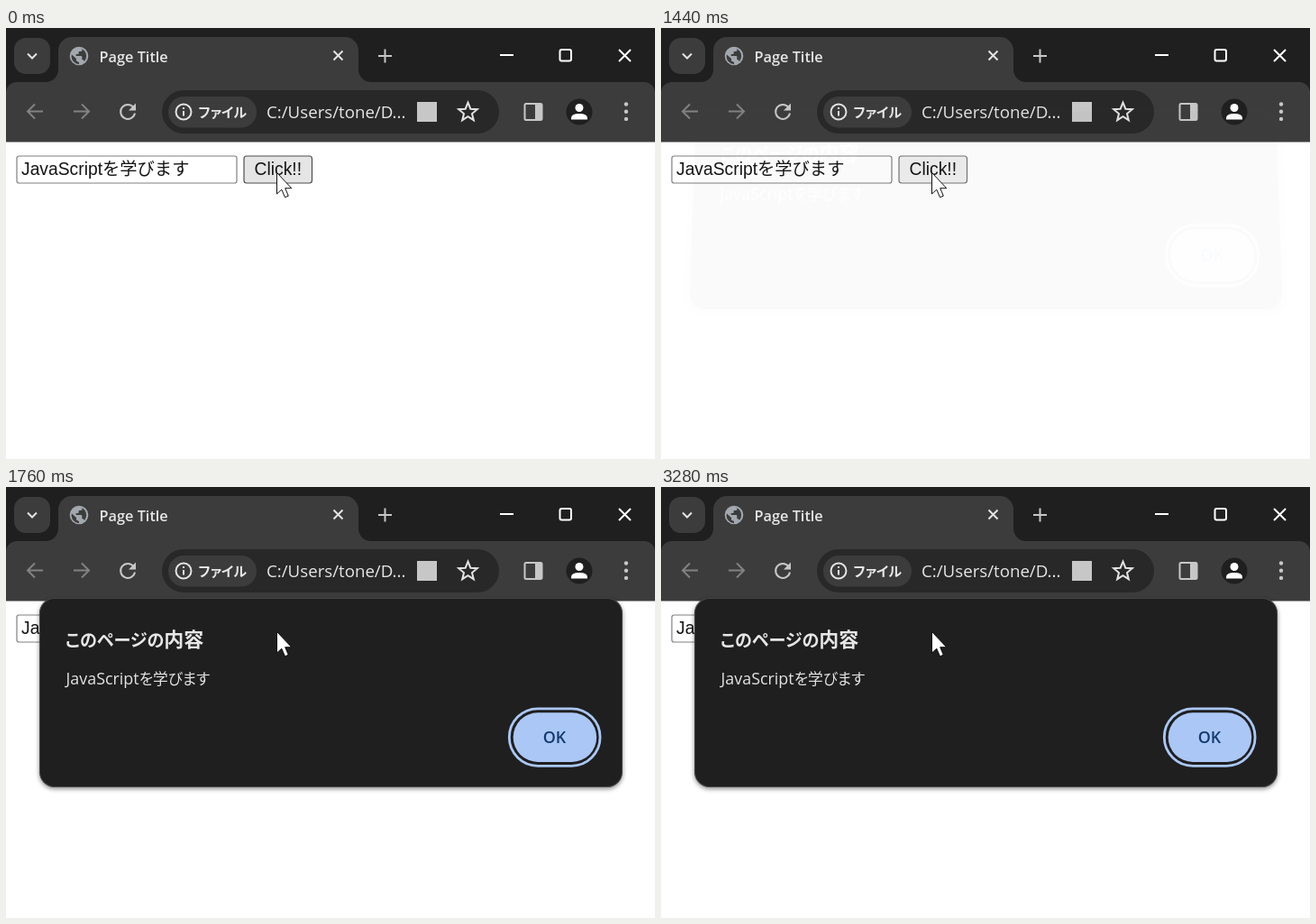
These frames come from a looping animation (720 by 478 pixels, 3.36 s). An HTML page:

```html
<!DOCTYPE html>
<html lang="ja">
<head>
<meta charset="utf-8">
<title>Page Title</title>
<style>
  html, body { margin: 0; width: 100%; height: 100%; overflow: hidden; background: #fff; }
  svg { position: absolute; left: 0; top: 0; display: block; }
  .ui { font-family: "Open Sans", "Noto Sans", "Noto Sans CJK JP", sans-serif; }
  .jp { font-family: "Noto Sans CJK JP", "Noto Sans CJK", sans-serif; font-feature-settings: "palt"; }
  .form { font-family: "Liberation Sans", "Noto Sans CJK JP", sans-serif; font-size: 19.3px; fill: #141414; }
  .line { fill: none; stroke: #e3e3e3; stroke-width: 2; }
  .dim { stroke: #828282; }
  .soft { stroke: #c7c7c7; }
  .bright { stroke: #fff; }
  #dialog {
    position: absolute; left: 37px; top: 122.5px; width: 647px; height: 210.5px;
    box-sizing: border-box; border-radius: 17px; background: #1f1f1f;
    box-shadow: 0 0 0 1px rgba(110, 110, 110, .5) inset, 0 2px 5px rgba(0, 0, 0, .45);
  }
</style>
</head>
<body>
<svg width="720" height="478" viewBox="0 0 720 478">
  <!-- title bar and tab -->
  <rect width="720" height="80" fill="#1f1f1f"/>
  <path fill="#3c3c3c" d="M0 127V72A12 12 0 0 1 12 60H44A14 14 0 0 0 58 46V25A15 15 0 0 1 73 10H376A15 15 0 0 1 391 25V46A14 14 0 0 0 405 60H708A12 12 0 0 1 720 72V127Z"/>
  <rect x="9" y="11" width="40" height="40" rx="13" fill="#3c3c3c"/>
  <path class="line" d="M24 28.5l5 5 5-5"/>
  <circle cx="81" cy="31" r="10.3" fill="#a3a8ae"/>
  <path fill="#3c3c3c" d="M73 29.5l5 4.500v2.500l3 1.500v2.200q-8-1.500-8.500-9zM83 22.800q6 2 6.200 8.500-.2 3.500-2.200 5.700-.8-2-2.700-2v-3q0-1-1-1h-5.600v-2h2q1 0 1-1v-2h2q2 0 2-2z"/>
  <text class="ui" x="103.5" y="37.500" font-size="16.300" font-weight="600" fill="#e6e6e6">Page Title</text>
  <path class="line" d="M363.5 25.500l10 10m0-10l-10 10"/>
  <path class="line soft" d="M413 31h15M420.5 23.500v15"/>
  <path class="line bright" d="M548 30h15M680 24l13 13m0-13l-13 13"/>
  <rect class="line bright" x="614.5" y="24" width="12.500" height="12.500" rx="2"/>

  <!-- toolbar -->
  <path class="line dim" d="M41 92.500H24.500m7.500-8l-8 8 8 8"/>
  <path class="line dim" d="M75 92.500H91.500m-7.500-8l8 8-8 8"/>
  <path class="line soft" d="M141.5 88a8 8 0 1 0 1.500 6.500"/>
  <path fill="#c7c7c7" d="M144 83.500v8h-8z"/>
  <rect x="173" y="69" width="374" height="48" rx="24" fill="#282828"/>
  <rect x="180" y="76" width="98" height="34.500" rx="17.200" fill="#3c3c3c"/>
  <circle class="line" cx="197" cy="93" r="8.500"/>
  <path class="line" d="M197 92v5.500M197 88v2"/>
  <text class="jp" x="213.5" y="99" font-size="15" font-weight="700" fill="#e8e8e8">ファイル</text>
  <text class="ui" x="289" y="100" font-size="18.700" font-weight="500" fill="#e6e6e6">C:/Users/tone/D...</text>
  <rect x="456" y="82" width="22" height="22" fill="#c7c7c7"/>
  <path id="star" class="line"/>
  <rect class="line soft" x="575.5" y="84" width="19" height="18" rx="1.500"/>
  <path fill="#c7c7c7" d="M587 84h8v18h-8z"/>
  <circle cx="636" cy="93" r="14.500" fill="#1f1f1f"/>
  <circle cx="636" cy="88.500" r="4.500" fill="#fff"/>
  <path fill="#fff" d="M627 101.500v-1.500q0-5 9-5t9 5v1.500z"/>
  <g fill="#c7c7c7"><circle cx="688" cy="84.500" r="2.200"/><circle cx="688" cy="92.700" r="2.200"/><circle cx="688" cy="100.900" r="2.200"/></g>

  <!-- page -->
  <rect y="126.500" width="720" height="352" fill="#fff"/>
  <rect x="12" y="142" width="244" height="30" rx="2.500" fill="#fff" stroke="#808080" stroke-width="1.200"/>
  <text class="form" x="17" y="163">JavaScriptを学びます</text>
  <rect id="button" x="264" y="142" width="75.500" height="30" rx="3" stroke-width="1.200"/>
  <text class="form" x="275.5" y="163">Click!!</text>
</svg>

<div id="dialog">
  <svg width="647" height="210" viewBox="37 122.500 647 210">
    <text class="jp" x="66" y="176" font-size="19.100" font-weight="700" fill="#e6e6e6">このページの<tspan font-size="22">内容</tspan></text>
    <text class="ui" x="66.500" y="218.500" font-size="17.900" font-weight="500" fill="#e3e3e3">JavaScript<tspan class="jp" font-size="16.700">を学びます</tspan></text>
    <rect x="558.300" y="245.300" width="100.800" height="63.500" rx="31.700" fill="none" stroke="#abc7f6" stroke-width="2.800"/>
    <rect x="562.700" y="249.800" width="92.500" height="54.600" rx="27.300" fill="#abc7f6"/>
    <text class="ui" x="608.500" y="283.700" font-size="17.900" font-weight="600" text-anchor="middle" fill="#123a70">OK</text>
  </svg>
</div>

<svg width="720" height="478" viewBox="0 0 720 478">
  <path d="M300.5 160.500V184L305.800 179.200 309.500 187.800 313.300 186.200 309.700 177.700H316.800Z" fill="#fff" stroke="#111"/>
</svg>

<script>
  const LOOP = 3360, STEP = 80;
  const byId = id => document.getElementById(id);
  const button = byId('button'), dialog = byId('dialog');

  // start, fill, border
  const buttonStates = [
    [0, '#e5e5e5', '#4f4f4f'],
    [800, '#f5f5f5', '#8d8d8d'],
    [1440, '#efefef', '#767676']
  ];

  // start, opacity, shift, tilt, scaleX, scaleY
  const dialogPoses = [
    [0, 0, 0, 0, 1, 1],
    [1440, .027, -28, 6.3, 1.006, 1.05],
    [1520, .53, -16.5, 4.6, 1.0025, 1.018],
    [1600, 1, -3.5, .5, 1, 1.004],
    [1680, 1, 0, 0, 1, 1]
  ];

  const current = (table, t) => table.filter(row => row[0] <= t).pop();

  function starPath(cx, cy, outer, inner) {
    const points = Array.from({ length: 10 }, (_, i) => {
      const r = i % 2 ? inner : outer, a = i * Math.PI / 5;
      return (cx + r * Math.sin(a)).toFixed(1) + ' ' + (cy - r * Math.cos(a)).toFixed(1);
    });
    return 'M' + points.join('L') + 'Z';
  }

  function draw(t) {
    const [, fill, border] = current(buttonStates, t);
    button.setAttribute('fill', fill);
    button.setAttribute('stroke', border);

    const [, opacity, shift, tilt, sx, sy] = current(dialogPoses, t);
    dialog.style.opacity = opacity;
    dialog.style.transform = tilt
      ? `translateY(${shift}px) perspective(1000px) rotateX(${tilt}deg) scale(${sx}, ${sy})`
      : 'none';
  }

  byId('star').setAttribute('d', starPath(512.5, 93.5, 10.8, 4.7));

  const start = performance.now();
  function tick() {
    const t = (performance.now() - start) % LOOP;
    draw(Math.floor(t / STEP) * STEP);
    requestAnimationFrame(tick);
  }
  draw(0);
  requestAnimationFrame(tick);
</script>
</body>
</html>
```
